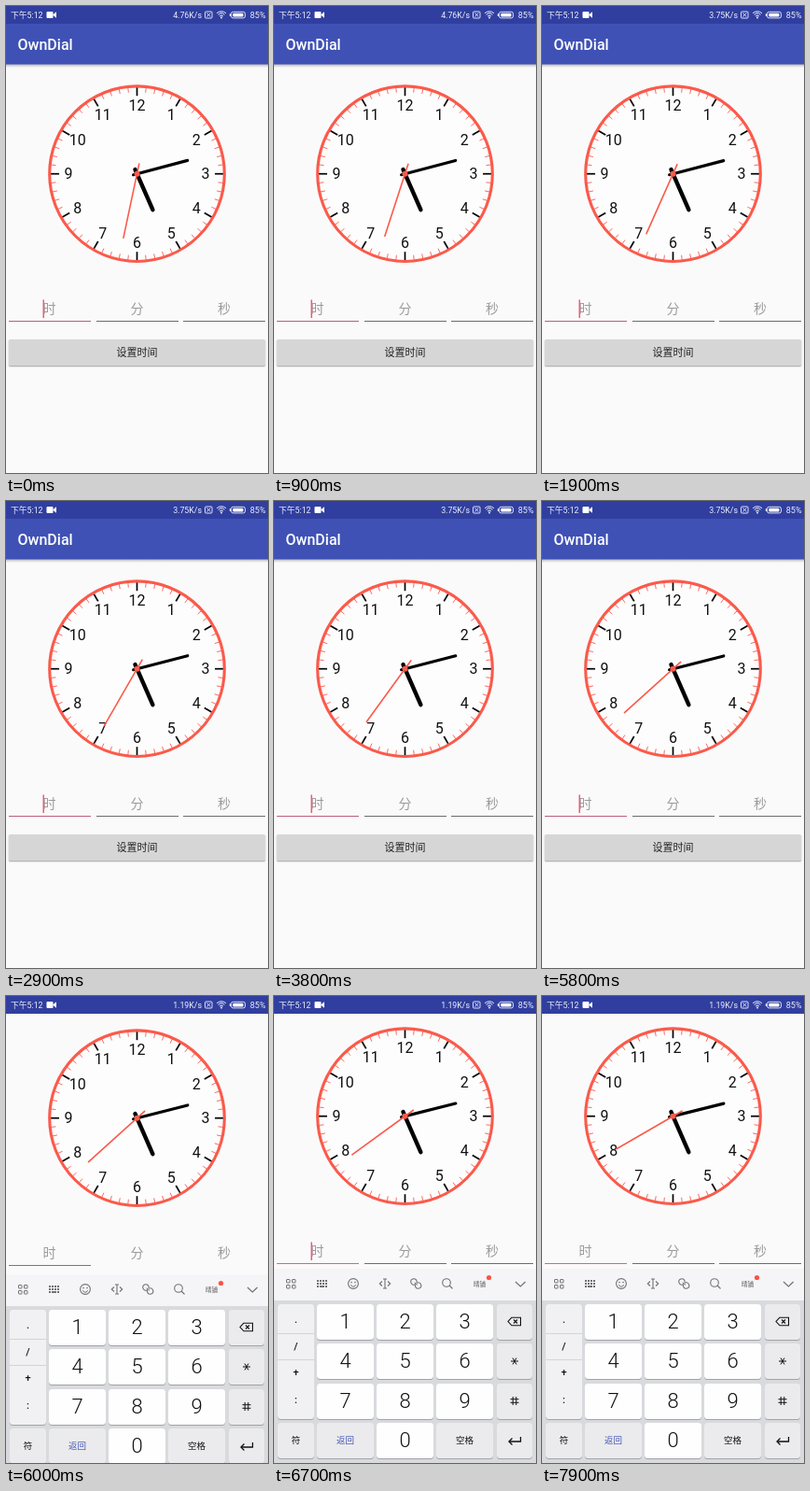
An HTML page with a canvas for the animation above (8 s loop, 281 by 500 pixels).

```html
<!DOCTYPE html>
<html lang="zh">
<head>
<meta charset="utf-8">
<style>
html, body { margin: 0; width: 100%; height: 100%; overflow: hidden; background: #fafafa; }
canvas { display: block; width: 281px; height: 500px; }
</style>
</head>
<body>
<canvas id="stage"></canvas>
<script>
const W = 281, H = 500, LOOP = 8000, TAP = 5800;
const RED = '#fb5a4b', INK = '#111', ICON = '#707076';
const LATIN = 'Roboto, "Noto Sans CJK SC", "Noto Sans CJK", sans-serif';
const canvas = document.getElementById('stage');
const g = canvas.getContext('2d');
const dpr = window.devicePixelRatio || 1;
canvas.width = W * dpr;
canvas.height = H * dpr;

function rect(x, y, w, h, color) {
  g.fillStyle = color;
  g.fillRect(x, y, w, h);
}

function round(x, y, w, h, r, color) {
  g.fillStyle = color;
  g.beginPath();
  g.roundRect(x, y, w, h, r);
  g.fill();
}

function dot(x, y, r, color) {
  g.fillStyle = color;
  g.beginPath();
  g.arc(x, y, r, 0, 7);
  g.fill();
}

function ring(x, y, r, width, color, from = 0, to = Math.PI * 2) {
  g.strokeStyle = color;
  g.lineWidth = width;
  g.beginPath();
  g.arc(x, y, r, from, to);
  g.stroke();
}

function path(points, width, color, cap = 'butt') {
  g.strokeStyle = color;
  g.lineWidth = width;
  g.lineCap = cap;
  g.beginPath();
  points.forEach(([x, y]) => g.lineTo(x, y));
  g.stroke();
}

function frame(x, y, w, h, r, width, color) {
  g.strokeStyle = color;
  g.lineWidth = width;
  g.beginPath();
  g.roundRect(x, y, w, h, r);
  g.stroke();
}

// Text centred vertically on cy
function text(str, x, cy, size, color, align = 'center', weight = 400) {
  g.font = `${weight} ${size}px ${LATIN}`;
  g.fillStyle = color;
  g.textAlign = align;
  g.fillText(str, x, cy + size * 0.36);
}

// Radial line on the dial, angle in degrees clockwise from 12
function spoke(deg, from, to, width, color, cap) {
  const a = deg * Math.PI / 180, sx = Math.sin(a), sy = -Math.cos(a);
  path([[sx * from, sy * from], [sx * to, sy * to]], width, color, cap);
}

function clock(sec) {
  g.save();
  g.translate(140.5, 179.7);
  dot(0, 0, 94, '#fdfdfd');
  for (let i = 0; i < 60; i++) {
    if (i % 5) spoke(i * 6, 87.5, 93, 0.9, RED);
    else spoke(i * 6, 83.5, 93.5, 1.7, '#000');
  }
  ring(0, 0, 93.8, 3.1, RED);
  for (let n = 1; n <= 12; n++) {
    const a = n * Math.PI / 6;
    text(n, Math.sin(a) * 73.5, -Math.cos(a) * 73.5, 16, INK);
  }
  const min = 12 + sec / 60;
  spoke(150 + min / 2, -5, 42, 4.4, '#000', 'round');
  spoke(min * 6, -4, 56, 3.2, '#000', 'round');
  spoke(sec * 6, -11, 70, 1.6, RED, 'round');
  dot(0, 0, 3, RED);
  g.restore();
}

function form(t, sliding) {
  const focus = t < TAP + 100 ? '#b8607c' : sliding ? '#777' : '#e4607a';
  [['时', 3, 46.5], ['分', 97, 140.5], ['秒', 190, 234]].forEach(([label, x, cx], i) => {
    text(label, cx, 324, 14, '#9b9b9d');
    // only the focused field keeps its line while the page slides
    if (!i || !sliding) rect(x, 337, 88, 1, i ? '#6c6c6e' : focus);
  });
  const lit = t < TAP + 100 ? (t + 500) % 1000 < 600 : (t + 600) % 1000 < 500;
  if (lit) rect(39.5, 314.5, 1.5, 19.5, '#f8567c');

  g.save();
  g.shadowColor = 'rgba(0,0,0,.35)';
  g.shadowBlur = 1.5 * dpr;
  g.shadowOffsetY = dpr;
  round(3, 357, 275, 28, 1.5, '#d6d6d7');
  g.restore();
  text('设置时间', 140.5, 371, 11, '#222');
}

function appBar() {
  const shade = g.createLinearGradient(0, 62, 0, 66);
  shade.addColorStop(0, 'rgba(0,0,0,.28)');
  shade.addColorStop(1, 'rgba(0,0,0,0)');
  rect(0, 62, W, 4, shade);
  rect(0, 0, W, 62.5, '#3f51b5');
  text('OwnDial', 12.5, 41, 16, '#fff', 'left', 500);
}

function statusBar(t) {
  const pale = '#eef0fa';
  rect(0, 0, W, 19, '#303f9f');
  text('下午5:12', 5, 9.5, 8.8, pale, 'left');
  round(43.5, 6, 7, 7, 1, '#fff');
  g.beginPath();
  g.moveTo(50, 9.5);
  g.lineTo(54, 6.3);
  g.lineTo(54, 12.7);
  g.fill();
  const speed = t < 1900 ? '4.76' : t < 5900 ? '3.75' : '1.19';
  text(speed + 'K/s', 210, 9.5, 8.8, pale, 'right');
  frame(213.5, 6, 7.5, 7, 1, 0.9, pale);
  path([[215.3, 7.6], [219.3, 11.4]], 0.9, pale);
  path([[219.3, 7.6], [215.3, 11.4]], 0.9, pale);
  const up = -Math.PI / 2;
  [2.8, 5, 7.2].forEach(r => ring(231, 13, r, 1, pale, up - 0.75, up + 0.75));
  dot(231, 12.4, 1, pale);
  frame(241.5, 6.3, 15, 6.6, 2, 0.9, pale);
  round(243.2, 7.8, 11.3, 3.6, 1, '#fff');
  rect(239.8, 8.3, 1.2, 2.6, pale);
  text('85%', 278.5, 9.5, 9, pale, 'right');
}

function toolbar() {
  const y = 308;
  [[13, -5], [19, -5], [13, 1], [19, 1]].forEach(([x, dy]) => frame(x + 0.5, y + dy + 0.5, 3.5, 3.5, 0.5, 1, ICON));
  for (let i = 0; i < 8; i++) rect(46 + i % 4 * 3, y - 4 + (i >> 2) * 3, 2, 2, ICON);
  rect(49, y + 2, 5, 2, ICON);
  rect(46, y + 2, 2, 2, ICON);
  rect(55, y + 2, 2, 2, ICON);

  ring(85, y, 5.4, 1.1, ICON);
  dot(83, y - 1.4, 0.8, ICON);
  dot(87, y - 1.4, 0.8, ICON);
  ring(85, y + 0.6, 2.6, 1, ICON, 0.2, Math.PI - 0.2);

  path([[119, y - 5], [119, y + 5]], 1.1, ICON);
  path([[117, y - 5], [121, y - 5]], 1, ICON);
  path([[117, y + 5], [121, y + 5]], 1, ICON);
  path([[116, y - 2.5], [113.3, y], [116, y + 2.5]], 1.1, ICON);
  path([[122, y - 2.5], [124.7, y], [122, y + 2.5]], 1.1, ICON);

  // two open, interlocking links
  ring(150, y - 2, 3.2, 1.1, ICON, 1.2, 6.8);
  ring(154.6, y + 2, 3.2, 1.1, ICON, -1.9, 3.7);
  path([[150.6, y - 1.2], [154, y + 1.4]], 1, ICON);

  ring(185, y - 1, 4.3, 1.1, ICON);
  path([[188.1, y + 2], [191.5, y + 5.4]], 1.2, ICON);
  text('晴铺', 220.5, y + 0.5, 6.5, '#555', 'center', 500);
  dot(230.5, 301.5, 2.6, '#ff5144');
  path([[259, y - 2], [264.3, y + 3], [269.6, y - 2]], 1.2, ICON);
}

function key(x, y, w, h, color) {
  round(x, y + 1, w, h, 3.5, '#a2a3a7');
  round(x, y, w, h, 3.5, color);
}

function keyboard(dy) {
  const white = '#fefefe', soft = '#ebebed', rows = [330, 372, 415, 457];
  g.save();
  g.translate(0, dy);
  rect(0, 292, W, 34, '#f5f4f7');
  rect(0, 326, W, 175, '#d9dadd');
  toolbar();

  key(4, 330, 39, 123, '#f1f1f3');
  rect(4, 361, 39, 1, '#d4d4d8');
  rect(4, 389, 39, 1, '#d4d4d8');
  ['.', '/', '+', ':'].forEach((c, i) => text(c, 23.5, 346 + i * 28.7, 11, INK, 'center', 500));

  for (let i = 0; i < 9; i++) {
    const x = 46 + i % 3 * 64, y = rows[Math.floor(i / 3)];
    key(x, y, 61, 38, white);
    text(i + 1, x + 30.5, y + 18.5, 22, INK, 'center', 300);
  }
  rows.forEach(y => key(239, y, 38, 38, soft));
  key(4, 457, 39, 38, soft);
  key(46, 457, 61, 38, soft);
  key(110, 457, 61, 38, white);
  key(174, 457, 61, 38, soft);
  text('符', 23.5, 475.5, 9.5, INK);
  text('返回', 76.5, 475.5, 9.5, '#4757b4');
  text('0', 140.5, 475.5, 22, INK, 'center', 300);
  text('空格', 204.5, 475.5, 9.5, INK);

  path([[251, 348.5], [255, 344.2], [264.5, 344.2], [264.5, 352.8], [255, 352.8], [251, 348.5], [255, 344.2]], 1.1, INK);
  path([[257, 346.5], [261, 350.5]], 1.1, INK);
  path([[261, 346.5], [257, 350.5]], 1.1, INK);
  for (let i = 0; i < 3; i++) {
    const a = i * Math.PI / 3, c = Math.cos(a) * 4, s = Math.sin(a) * 4;
    path([[258 - c, 391 - s], [258 + c, 391 + s]], 1, INK);
  }
  [-1.8, 1.8].forEach(d => {
    path([[258 + d, 429], [258 + d, 438]], 1, INK);
    path([[253.5, 433.5 + d], [262.5, 433.5 + d]], 1, INK);
  });
  path([[264.5, 472], [264.5, 477], [252, 477]], 1.3, INK);
  path([[255.5, 473.5], [252, 477], [255.5, 480.5]], 1.3, INK);
  g.restore();
}

function draw(t) {
  const left = Math.pow(1 - Math.min(1, Math.max(0, (t - TAP) / 290)), 3);
  g.setTransform(dpr, 0, 0, dpr, 0, 0);
  rect(0, 0, W, H, '#fafafa');
  g.save();
  g.translate(0, -Math.round(51 * (1 - left)));
  appBar();
  clock(32 + Math.floor((t + 700) / 1000));
  form(t, left > 0 && left < 1);
  g.restore();
  if (left < 1) keyboard(Math.round(208 * left));
  statusBar(t);
}

const start = performance.now();
function tick() {
  const t = (performance.now() - start) % LOOP;
  draw(Math.floor(t / 100) * 100);
  requestAnimationFrame(tick);
}
tick();
</script>
</body>
</html>
```
